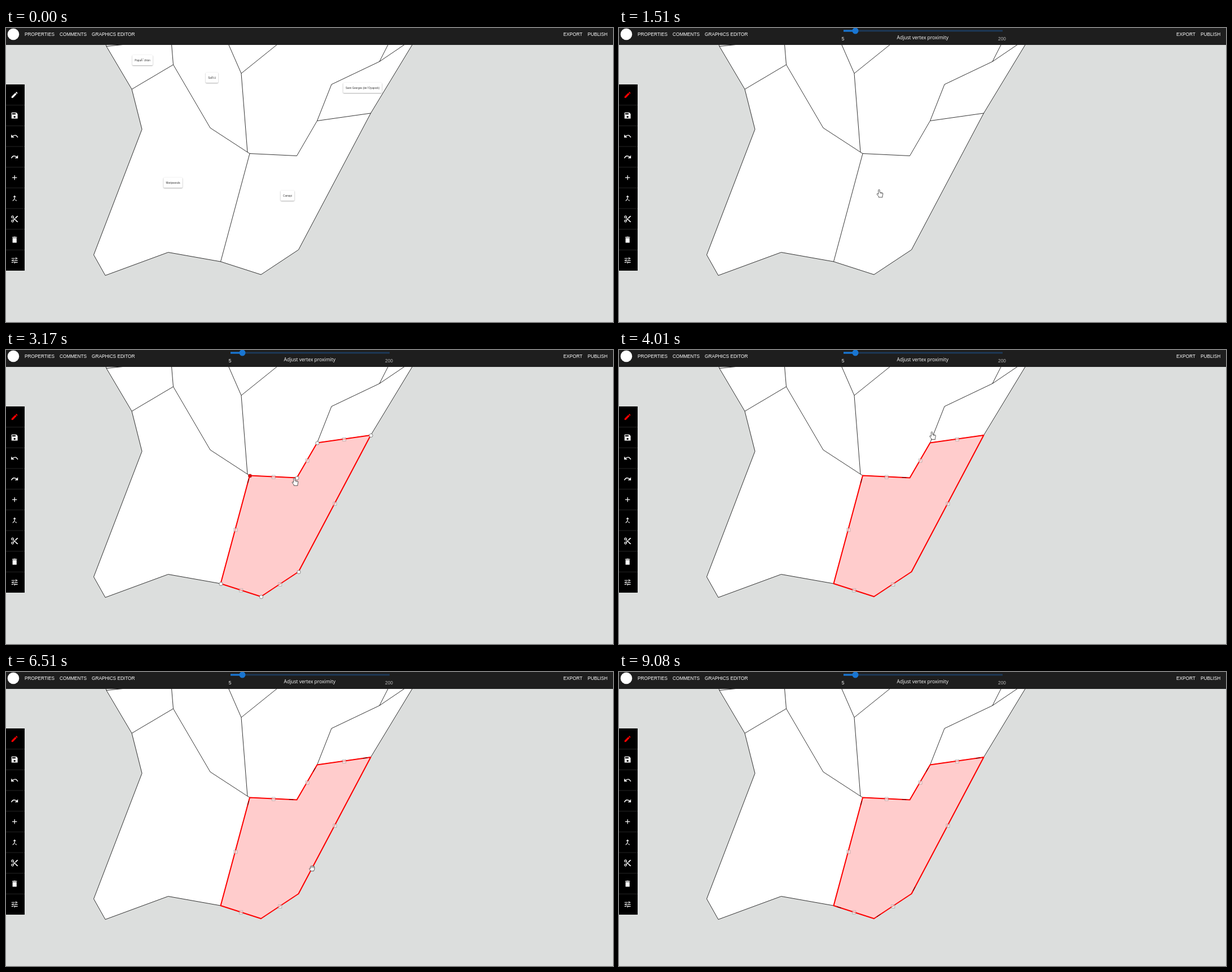
These frames come from a looping animation (1076x521 px, 9.51 s). An HTML page with a canvas:

```html
<!DOCTYPE html>
<html lang="en">
<head>
<meta charset="utf-8">
<title>Map editor</title>
<style>
html, body { margin: 0; width: 100%; height: 100%; overflow: hidden; background: #dcdedd; }
canvas { display: block; }
</style>
</head>
<body>
<canvas id="stage" width="1076" height="521"></canvas>
<script>
const ctx = document.getElementById('stage').getContext('2d');
const W = 1076, H = 521, LOOP = 9510;
const SANS = '"Liberation Sans", Arial, sans-serif';
const ENTER_AT = 220, EDIT_AT = 1190, SELECT_AT = 1610;

const lerp = (a, b, k) => a + (b - a) * k;
const ease = k => k * k * (3 - 2 * k);

const land = new Path2D('M177 29L178 32.5 223 108.5 241 179.5 155.5 402 176 438.5 287.5 397.5 380.5 414 452 437 518.5 393 646.5 151 720.5 29Z');
const borders = new Path2D(
  'M178 32.5L207 29.5M223 108.5L296.5 65 293.5 29M296.5 65L362 177 428 220 417 80.5 394.5 29' +
  'M417 80.5L481 29M428 220L432 222.5 515.5 226.5 551.5 164.5 577 100 662 59.5 677.5 29' +
  'M662 59.5L707 29M551.5 164.5L646.5 151M432 222.5L380.5 414');

const labels = [
  ['PapaÃ¯chton', 242, 57], ['SaÃ¼l', 365, 88], ["Saint Georges (de l'Oyapock)", 632, 106],
  ['Maripasoula', 296, 274], ['Camopi', 499, 297]
];

// Corners of the edited area, with the time each one is picked
const corners = [
  { x: 432, y: 222.5, at: 2290 }, { x: 515.5, y: 226.5, at: 3430 }, { x: 551.5, y: 164.5, at: 4500 },
  { x: 646.5, y: 151, at: 5820 }, { x: 518.5, y: 393, at: 6810 }, { x: 452, y: 437, at: 7760 },
  { x: 380.5, y: 414, at: 8590 }
];
const before = i => corners[(i + corners.length - 1) % corners.length];

// The pointer rests after each pick, then reaches the next corner a little early
const rests = corners.flatMap(({ x, y, at }, i) => {
  const last = i ? corners[i - 1].at : SELECT_AT;
  const next = i < corners.length - 1 ? corners[i + 1].at : at;
  return [{ at: lerp(last, at, .85), x, y }, { at: lerp(at, next, .3), x, y }];
});
const route = [
  { at: 180, x: 1020, y: 526 }, { at: 1160, x: 13, y: 117 }, { at: EDIT_AT, x: 13, y: 117 },
  { at: 1510, x: 461, y: 286 }, { at: SELECT_AT, x: 461, y: 286 },
  ...rests, { at: 4010, x: 554.5, y: 144.5 }, { at: 9080, x: 1054, y: 530 }
].sort((a, b) => a.at - b.at);

const circle = (x, y, r) => `M${x - r} ${y}a${r} ${r} 0 1 0 ${2 * r} 0a${r} ${r} 0 1 0 ${-2 * r} 0Z`;
const undo = new Path2D('M2 7V16H11L7.4 12.4Q16 6.5 20.1 16L22.5 15.2Q17 3.5 5.6 10.6Z');
const redo = new Path2D();
redo.addPath(undo, new DOMMatrix([-1, 0, 0, 1, 24, 0]));

const icons = [
  new Path2D('M3 17.2V21H6.8L17.8 9.9 14.1 6.2ZM15.1 5.1L18.9 8.9 21 6.5 17.5 3Z'),
  new Path2D('M3 3H17L21 7V21H3ZM5 5V9H15V5Z' + circle(12, 16, 3)),
  undo,
  redo,
  new Path2D('M11 5h2v6h6v2h-6v6h-2v-6H5v-2h6Z'),
  new Path2D('M7.5 8L12 3.5 16.5 8H13V14.4L7 20.4 5.6 19 11 13.6V8ZM17 20.4L18.4 19 15 15.6 13.6 17Z'),
  new Path2D([6, 18].map(y => circle(6, y, 4) + circle(6, y, 2)).join('') +
    'M8.2 9.6L9.6 8.2 22 20V21H19ZM13 9L19 3H22V4L15 11ZM7.6 14.4L10 12 12 14 9.6 16.4Z'),
  new Path2D('M6 7H18V21H6ZM5 4H8.5L9.5 3H14.5L15.5 4H19V6H5Z'),
  new Path2D('M3 5h10v2H3ZM15 3h2v2h4v2h-4v2h-2ZM3 11h4V9h2v6H7v-2H3ZM11 11h10v2H11ZM3 17h6v2H3ZM11 15h2v2h8v2h-8v2h-2Z')
];

const hand = {
  body: new Path2D('M-1.2 1.2Q0-.8 1.2 1.2V5.2L5.6 6Q7 6.3 6.9 8L6 12V14H-.8V12.5L-3.8 8.6Q-3.6 6.9-2.2 7.6L-1.2 8.6Z'),
  lines: new Path2D('M3 5.8V8M5 6.2V8')
};
const grab = {
  body: new Path2D('M-2.7 .6V-3.2Q-1.8-4.6-.9-3.6Q0-5.4 1-3.9Q2.2-4.8 2.8-3.2Q4.2-3.8 4.4-2V1.6L3 5H-2.2L-4.8 1Q-4.4-.8-2.7 .6Z'),
  lines: new Path2D('M-.9-3.6V-.5M1-3.9V-.5M2.8-3.2V-.3')
};

function rect(x, y, w, h, color) {
  ctx.fillStyle = color;
  ctx.fillRect(x, y, w, h);
}

function disc(x, y, r, color) {
  ctx.beginPath();
  ctx.arc(x, y, r, 0, Math.PI * 2);
  ctx.fillStyle = color;
  ctx.fill();
}

function stroke(color, width, path) {
  ctx.strokeStyle = color;
  ctx.lineWidth = width;
  path ? ctx.stroke(path) : ctx.stroke();
}

function text(str, x, y, size, color = '#fff', align = 'left', family = SANS) {
  ctx.font = `${size}px ${family}`;
  ctx.textAlign = align;
  ctx.fillStyle = color;
  ctx.fillText(str, x, y);
}

function pointerAt(t) {
  const i = route.findIndex(p => p.at > t);
  if (t < ENTER_AT || i < 1) return null;
  const a = route[i - 1], b = route[i];
  const k = ease((t - a.at) / (b.at - a.at));
  return { x: lerp(a.x, b.x, k), y: lerp(a.y, b.y, k) };
}

const nearCorner = (p, reach) => p && corners.some(c => Math.hypot(c.x - p.x, c.y - p.y) < reach);

function drawLabel([str, x, y]) {
  ctx.font = `4.6px ${SANS}`;
  const w = ctx.measureText(str).width + 8.5;
  ctx.save();
  ctx.shadowColor = 'rgba(0,0,0,.4)';
  ctx.shadowBlur = 2;
  ctx.shadowOffsetY = .7;
  ctx.beginPath();
  ctx.roundRect(x - w / 2, y - 9, w, 18, 1.5);
  ctx.fillStyle = '#fff';
  ctx.fill();
  ctx.restore();
  text(str, x, y + 2, 4.6, '#333', 'center');
}

// Short dark piece of the edge leading to a picked corner
function drawMark(from, to) {
  const len = Math.hypot(to.x - from.x, to.y - from.y);
  ctx.beginPath();
  for (const gap of [14, 6]) {
    ctx.lineTo(lerp(to.x, from.x, gap / len), lerp(to.y, from.y, gap / len));
  }
  stroke('#300', .9);
}

function drawSelection(t, pointer) {
  ctx.beginPath();
  corners.forEach(c => ctx.lineTo(c.x, c.y));
  ctx.closePath();
  ctx.fillStyle = '#ffcccc';
  ctx.fill();
  stroke('#f00', 2);

  corners.forEach((c, i) => {
    const p = before(i);
    if (t >= c.at + 300) drawMark(p, c);
    ctx.beginPath();
    ctx.rect((c.x + p.x) / 2 - 2.5, (c.y + p.y) / 2 - 2.5, 6, 6);
    ctx.fillStyle = 'rgba(255,255,255,.55)';
    ctx.fill();
    stroke('rgba(110,110,110,.6)', .7);
  });

  if (t > corners[0].at && !nearCorner(pointer, 15)) return;
  for (const { x, y, at } of corners) {
    disc(x + .5, y + .5, 3.1, t >= at ? '#e60000' : '#fff');
    stroke(t >= at ? '#a33' : '#555', .7);
  }
}

function drawMap(t, pointer) {
  ctx.fillStyle = '#fff';
  ctx.fill(land);
  ctx.lineJoin = 'round';
  stroke('#000', .8, land);
  stroke('#000', .8, borders);
  if (t < EDIT_AT) labels.forEach(drawLabel);
  if (t >= SELECT_AT) drawSelection(t, pointer);
}

function drawSlider() {
  rect(398, 3.6, 282, 2.8, '#1d3a5a');
  rect(398, 3.4, 21, 3.2, '#1976d2');
  disc(419, 5, 5.5, '#1976d2');
  text('5', 397, 22, 8.25, '#fff', 'center');
  text('200', 679, 22, 8.25, '#b8b8b8', 'center');
  text('Adjust vertex proximity', 538.3, 20, 8.5, '#fff', 'center', '"Open Sans", sans-serif');
}

function drawHeader(t) {
  rect(0, 0, W, 30, '#1e1e1e');
  disc(13, 11, 10.3, '#fff');
  [['PROPERTIES', 33], ['COMMENTS', 95], ['GRAPHICS EDITOR', 152], ['EXPORT', 988], ['PUBLISH', 1031]]
    .forEach(([str, x]) => text(str, x, 14, 8.25));
  if (t >= EDIT_AT) drawSlider();
}

function drawSidebar(t) {
  const step = 330 / icons.length;
  rect(0, 100, 33, 330, '#000');
  icons.forEach((icon, i) => {
    const y = 100 + step * i;
    if (i) rect(0, y - .5, 33, 1, '#242424');
    ctx.save();
    ctx.translate(15.2, y + 18.5);
    ctx.scale(.6, .6);
    ctx.translate(-12, -12);
    ctx.fillStyle = i === 0 && t >= EDIT_AT ? '#f00' : '#fff';
    ctx.fill(icon, 'evenodd');
    ctx.restore();
  });
}

function drawPointer(p) {
  const onBar = p.x < 33 && p.y > 100 && p.y < 430;
  const pointing = onBar || nearCorner(p, 4) || ctx.isPointInPath(land, p.x, p.y);
  const shape = pointing ? hand : grab;
  ctx.save();
  ctx.translate(p.x, p.y);
  ctx.fillStyle = '#fff';
  ctx.fill(shape.body);
  stroke('#222', .75, shape.body);
  stroke('#222', .6, shape.lines);
  ctx.restore();
}

const start = performance.now();

function frame() {
  const t = (performance.now() - start) % LOOP;
  const pointer = pointerAt(t);
  rect(0, 0, W, H, '#dcdedd');
  drawMap(t, pointer);
  drawHeader(t);
  drawSidebar(t);
  if (pointer) drawPointer(pointer);
  requestAnimationFrame(frame);
}
frame();
</script>
</body>
</html>
```
